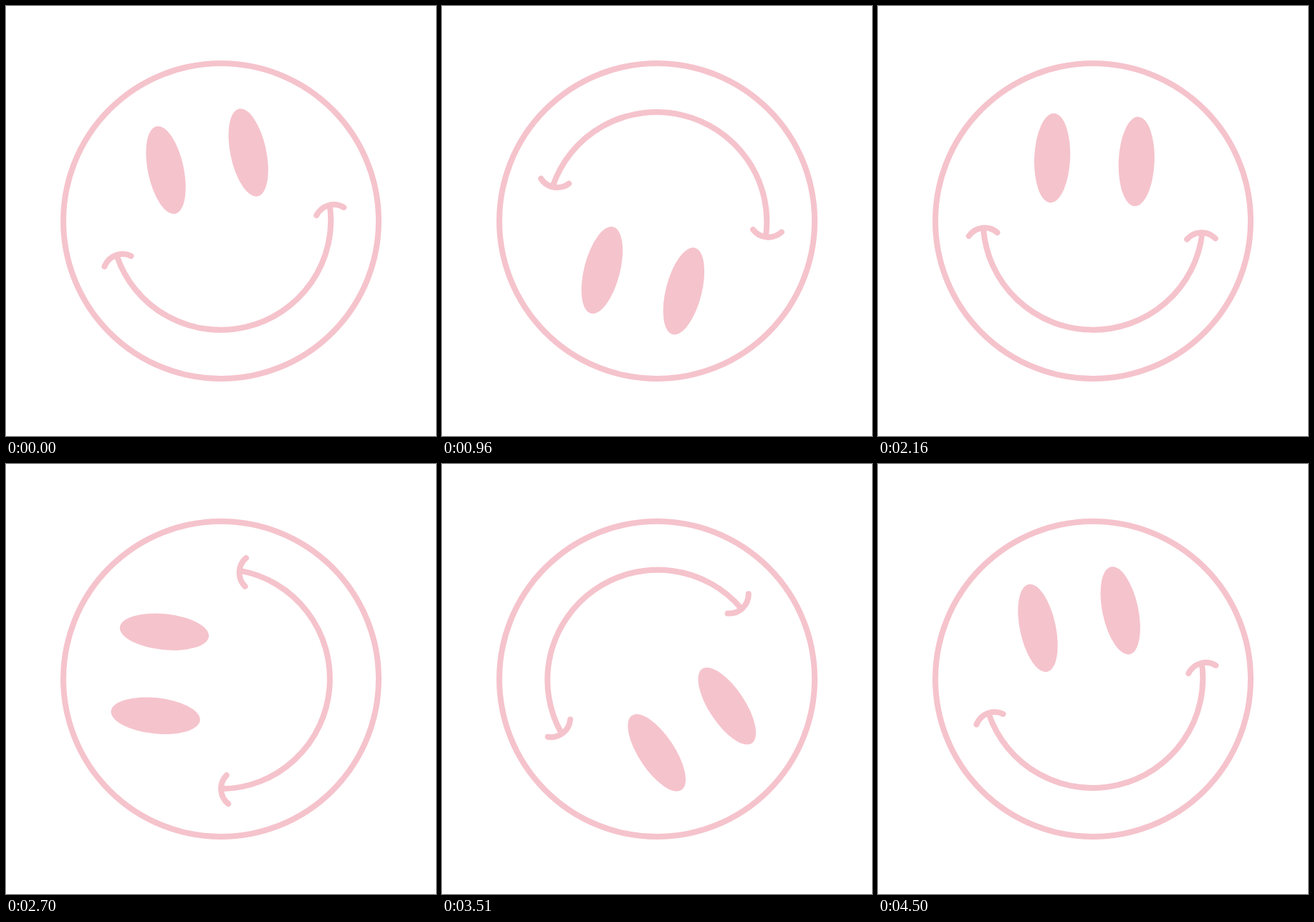
Recreate the animation shown at these times as an HTML page. Size 600 by 600 pixels, loop 4530 ms.

```html
<!DOCTYPE html>
<html lang="en">
<head>
<meta charset="utf-8">
<title>Rolling smile</title>
<style>
  html, body { margin: 0; width: 100%; height: 100%; overflow: hidden; background: #fff; }
  svg { display: block; width: 100%; height: 100%; }
  .line { fill: none; stroke: #f5c3cc; stroke-width: 8; stroke-linecap: round; }
  .eye { fill: #f5c3cc; }
</style>
</head>
<body>
<svg viewBox="-300 -300 600 600">
  <circle class="line" r="220"/>
  <g id="face">
    <ellipse class="eye" cx="-60.5" cy="-85.5" rx="25" ry="62.4"/>
    <ellipse class="eye" cx="57.2" cy="-85.5" rx="25" ry="62.4"/>
    <path class="line" d="M-152.4 17A153.4 152.3 0 0 0 153 10.5"/>
    <path class="line" d="M-172.2 28.3A27 27 0 0 1 -132.8 21.7M132 20A27 27 0 0 1 171.6 17.1"/>
  </g>
</svg>
<script>
  const LOOP = 4530, STEP = 30, TURN = 2250, START = -12;
  const face = document.getElementById('face');
  const origin = performance.now();

  function draw() {
    const elapsed = (performance.now() - origin) % LOOP;
    const time = Math.floor(elapsed / STEP) * STEP;
    face.setAttribute('transform', `rotate(${START - 360 * time / TURN})`);
    requestAnimationFrame(draw);
  }
  draw();
</script>
</body>
</html>
```
